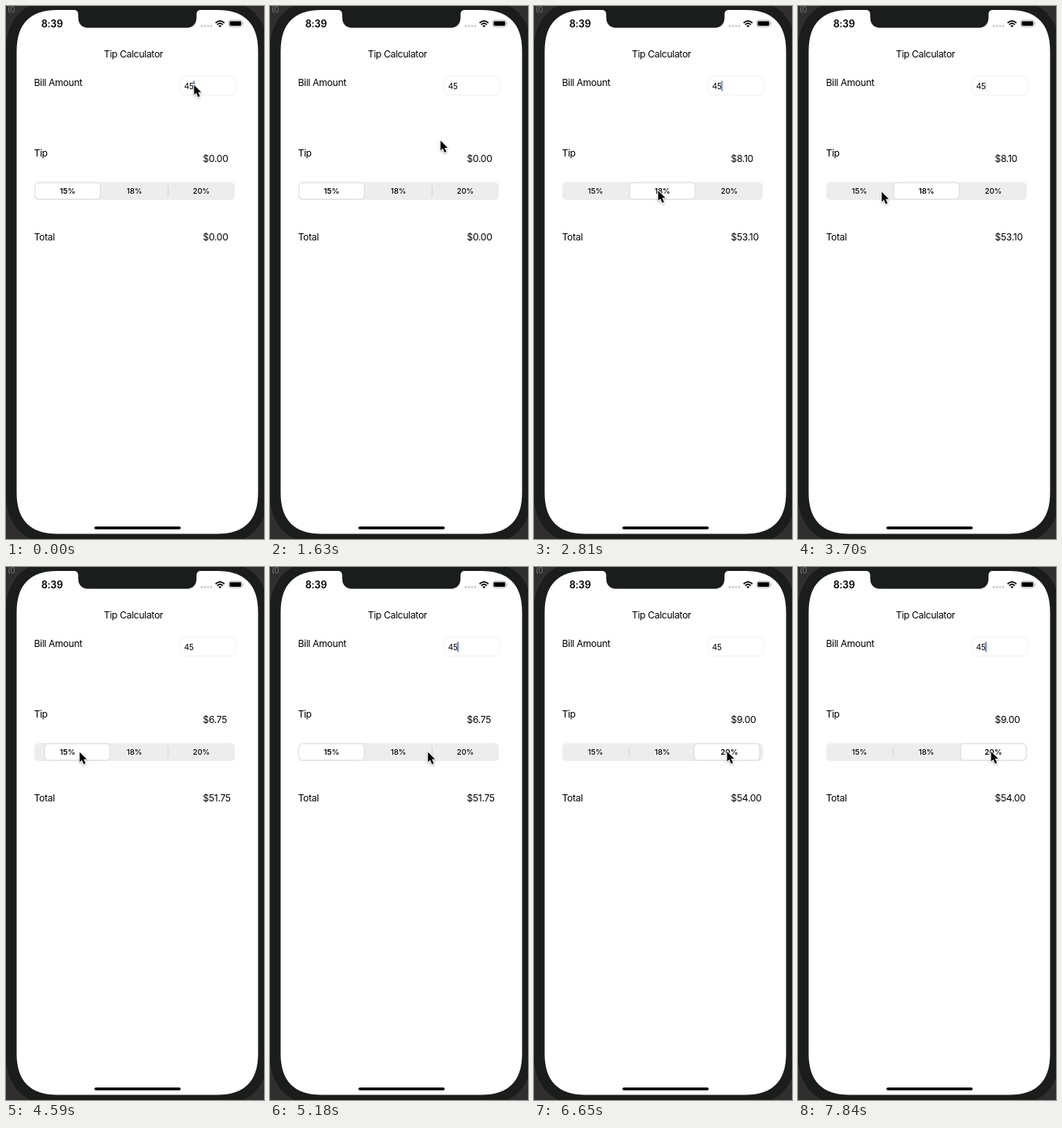
Animation of 327 by 673 pixels, one loop 7.99 s. Source, as an HTML page:

```html
<!DOCTYPE html>
<html lang="en">
<head>
<meta charset="utf-8">
<title>Tip Calculator</title>
<style>
  html, body { margin: 0; width: 100%; height: 100%; overflow: hidden; background: #302e2f; }
  svg { display: block; }
  text { font: 12.1px Inter, "Liberation Sans", sans-serif; letter-spacing: -.31px; }
  .title { text-anchor: middle; }
  .clock { font-size: 12.5px; font-weight: 600; letter-spacing: -.15px; }
  .field { font-size: 10.1px; letter-spacing: -.25px; }
  #segments text { font-size: 9.6px; letter-spacing: 0; text-anchor: middle; }
  #pill { filter: drop-shadow(0 .8px .8px rgba(0, 0, 0, .18)); }
  #pointer { filter: drop-shadow(0 1px 1px rgba(0, 0, 0, .3)); }
</style>
</head>
<body>
<svg width="327" height="673" viewBox="0 0 327 673">
  <text x="2" y="8" fill="#777" style="font-size:10px">(0</text>
  <path id="body" fill="#1b1d1c"/>
  <path id="screen" fill="#fff"/>
  <path d="M86 4V5Q91.5 5 91.5 10.500V14Q91.5 27.6 105.500 27.6H227.500Q241.5 27.6 241.5 14V10.500Q241.5 5 247 5V4Z" fill="#1b1d1c"/>
  <rect x="112" y="657.2" width="109.5" height="3.6" rx="1.8"/>

  <text class="clock" x="44.7" y="27">8:39</text>
  <path d="M248.300 25.300H260.500" stroke="#c6c6c8" stroke-width="2.800" stroke-linecap="round" stroke-dasharray="0 3.9"/>
  <g fill="none" stroke="#000" stroke-width="1.7">
    <path d="M265.600 21.300Q271.200 16.300 276.800 21.300M267.600 23.600Q271.200 20.300 274.800 23.600"/>
    <path d="M269.200 24.900Q271.200 23.400 273.200 24.900L271.200 26.900Z" fill="#000" stroke="none"/>
  </g>
  <rect x="282.3" y="18" width="17" height="8.2" rx="2.5" fill="none" stroke="#999" stroke-width=".8"/>
  <rect x="283.5" y="19.2" width="14.6" height="5.8" rx="1.4"/>
  <path d="M300.300 20.800Q301.800 22.100 300.300 23.400Z" fill="#999"/>

  <text class="title" x="161.5" y="65">Tip Calculator</text>
  <text x="35.5" y="101">Bill Amount</text>
  <text x="35.5" y="189.5">Tip</text>
  <text x="35.5" y="296">Total</text>
  <text id="tip" x="249.5" y="197.3"></text>
  <text id="total" x="249.5" y="296"></text>

  <rect x="221" y="88.7" width="70" height="23.7" rx="4" fill="#fff" stroke="#eee" stroke-width=".8"/>
  <text class="field" x="225.7" y="104.6">45</text>
  <rect id="caret" x="237.4" y="94.2" width="1.5" height="13.3" rx=".7" fill="#4167e0"/>

  <rect x="36" y="222.3" width="254" height="22.7" rx="5.5" fill="#ededee"/>
  <path id="sepLeft" d="M120.600 227V240.500" stroke="#d2d2d5"/>
  <path id="sepRight" d="M205.400 227V240.500" stroke="#d2d2d5"/>
  <rect id="pill" y="223.5" width="82" height="20" rx="4.5" fill="#fff"/>
  <g id="segments"></g>

  <path id="pointer" d="M.9 1.800V14.300L3.700 11.700L6 17L8.300 16L6 10.800H9.900Z"
        stroke="#fff" stroke-width="2" stroke-linejoin="round" paint-order="stroke"/>
</svg>
<script>
const LOOP = 7990, STEPS = 54, BILL = 45, RATES = [.15, .18, .2], PITCH = 84.8;
const $ = id => document.getElementById(id);

// Taps on the control: time and chosen segment
const taps = [{ at: 2340, to: 1 }, { at: 4398, to: 0 }, { at: 6330, to: 2 }];

// Pointer strokes: each bends through a control point to its end
const home = [237.5, 98];
const strokes = [
  { start: 1200, end: 2150, bend: [222, 192], to: [156.5, 231.5] },
  { start: 3400, end: 3820, bend: [124, 235], to: [92.5, 232] },
  { start: 4640, end: 5480, bend: [168, 233], to: [243.8, 231.3] }
];

const clamp = v => Math.max(0, Math.min(1, v));
const smooth = u => u * u * (3 - 2 * u);
const spring = ms => 1 - (1 + ms * .018) * Math.exp(-ms * .018);
const money = v => '$' + v.toFixed(2);
const setOpacity = (el, v) => el.setAttribute('opacity', v);

// Rectangle whose corners blend gently into its sides
function softRect(x, y, w, h, r) {
  const c = r * .67, d = r - c;
  return `M${x + r} ${y}h${w - 2 * r}c${c} 0 ${r} ${d} ${r} ${r}v${h - 2 * r}` +
    `c0 ${c} ${-d} ${r} ${-r} ${r}h${2 * r - w}c${-c} 0 ${-r} ${-d} ${-r} ${-r}` +
    `v${2 * r - h}c0 ${-c} ${d} ${-r} ${r} ${-r}z`;
}

$('body').setAttribute('d', softRect(-1, -9, 334, 690, 72));
$('screen').setAttribute('d', softRect(13.5, 5, 306, 661.5, 52));
$('segments').innerHTML = RATES.map((rate, i) =>
  `<text x="${78 + PITCH * i}" y="237.3">${Math.round(rate * 100)}%</text>`).join('');
const labels = [...$('segments').children];

function pointerAt(t) {
  return strokes.reduce((from, { start, end, bend, to }) => {
    const s = smooth(clamp((t - start) / (end - start)));
    return from.map((a, i) => (1 - s) ** 2 * a + 2 * s * (1 - s) * bend[i] + s * s * to[i]);
  }, home);
}

function draw(t) {
  const done = taps.filter(tap => tap.at <= t);
  const tap = done.pop() || { at: -LOOP, to: 0 };
  const from = done.length ? done.pop().to : 0;
  const p = spring(t - tap.at);
  const pos = from + (tap.to - from) * p;
  const used = tap.at > 0;
  const tip = used ? BILL * RATES[tap.to] : 0;

  $('tip').textContent = money(tip);
  $('total').textContent = money(used ? BILL + tip : 0);
  $('pill').setAttribute('x', 37 + PITCH * pos);
  setOpacity($('sepLeft'), clamp(pos - 1));
  setOpacity($('sepRight'), clamp(1 - pos));

  const selected = p < .5 ? from : tap.to;
  labels.forEach((el, i) => {
    el.style.fontWeight = i === selected ? 600 : 500;
    setOpacity(el, p < .5 && i === tap.to ? .5 : 1);
  });

  // The caret fades out and back in once a second
  const blink = (t + 620) % 1000;
  setOpacity($('caret'), Math.max(clamp(1 - blink / 190), clamp((blink - 280) / 170)));
  $('pointer').setAttribute('transform', `translate(${pointerAt(t)})`);
}

// The picture advances in discrete steps; the small bias absorbs timer rounding
function tick() {
  const t = performance.now() % LOOP;
  const step = Math.min(STEPS - 1, Math.floor(t / 147.7));
  draw(step * LOOP / STEPS);
  requestAnimationFrame(tick);
}
tick();
</script>
</body>
</html>
```
